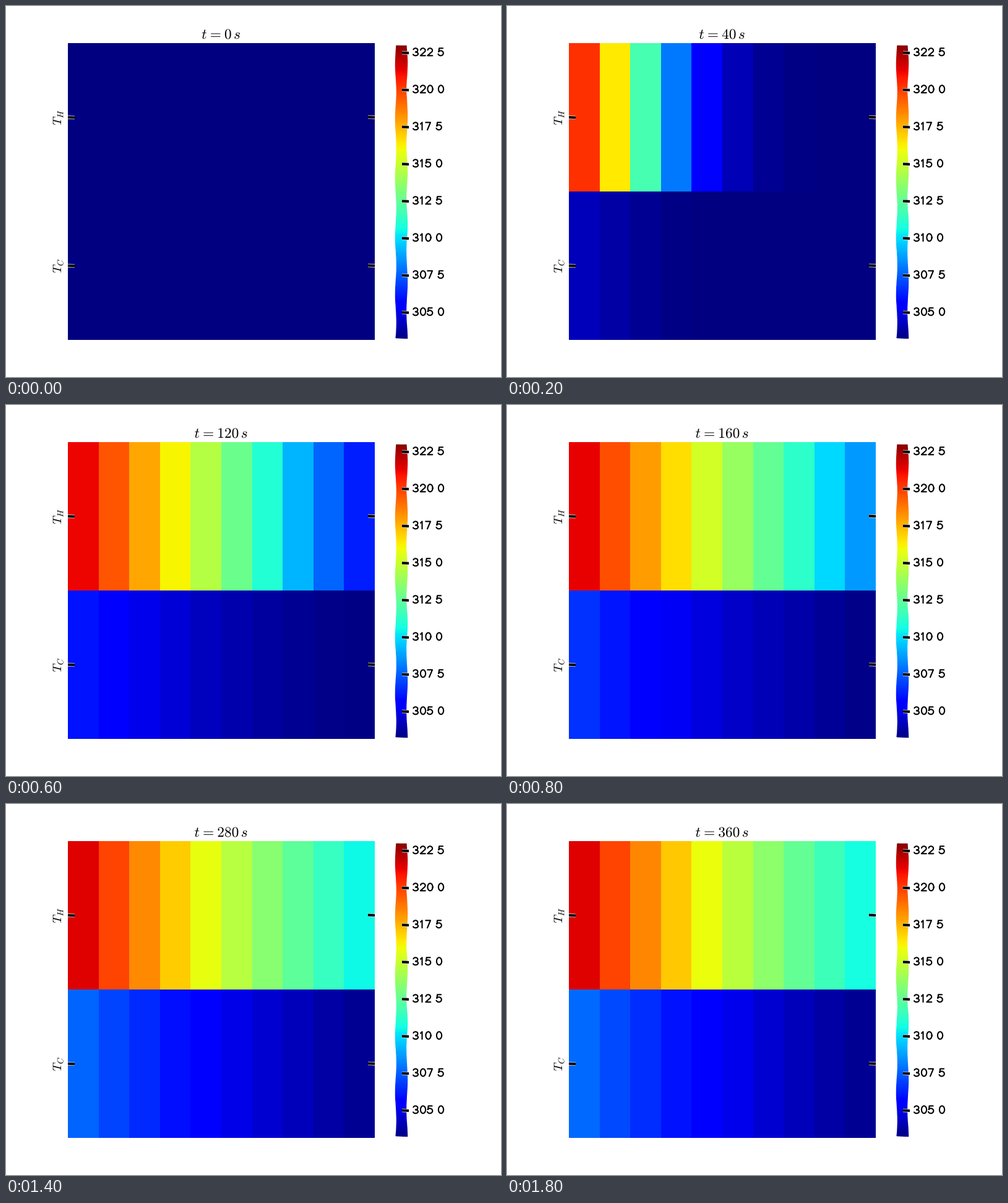
A matplotlib script that plays this animation: 800 by 600 pixels, repeating every 2000 ms.

```python
import numpy as np
import matplotlib.pyplot as plt
from matplotlib import patheffects
from matplotlib.animation import FuncAnimation

plt.rcParams.update({
    "path.sketch": (1, 100, 2),
    "path.effects": [patheffects.withStroke(linewidth=4, foreground="w")],
    "mathtext.fontset": "cm",
    "font.size": 14,
    "axes.titlepad": 5,
    "axes.axisbelow": False,
    "ytick.direction": "in",
    "ytick.major.size": 8,
    "ytick.major.width": 3,
    "ytick.major.pad": 4,
})

CELLS, FRAMES, STEP = 10, 10, 40
T_COLD, T_HOT = 303.15, 323.15
FLOW_HOT, FLOW_COLD = 0.070, 0.090       # cell renewal rates, 1/s
HEAT_HOT, HEAT_COLD = 0.0085, 0.0041     # exchange rates, 1/s


def simulate(dt=0.5):
    """Counterflow heat exchanger, one snapshot every STEP seconds."""
    hot = np.full(CELLS, T_COLD)
    cold = hot.copy()
    shots = []
    for _ in range(FRAMES):
        shots.append(np.array([hot, cold]))
        for _ in range(int(STEP / dt)):
            gap = hot - cold
            hot_in = np.r_[T_HOT, hot[:-1]]
            cold_in = np.r_[cold[1:], T_COLD]
            hot = hot + dt * (FLOW_HOT * (hot_in - hot) - HEAT_HOT * gap)
            cold = cold + dt * (FLOW_COLD * (cold_in - cold) + HEAT_COLD * gap)
    return shots


def arc(cx, cy, rx, ry, start, end):
    a = np.radians(np.linspace(start, end, 30))
    return list(zip(cx + rx * np.cos(a), cy + ry * np.sin(a)))


# Handwritten digits: (pen path with y down, advance)
GLYPHS = {
    "0": (arc(4.5, 6, 4.1, 6, 0, 365), 11.5),
    "1": ([(0.5, 2.5), (3, 0), (3, 12)], 8.5),
    "2": (arc(4.3, 3.6, 3.8, 3.6, 190, 390) + [(0.3, 12), (8.3, 12)], 11.5),
    "3": (arc(3.8, 3.1, 3.6, 3.1, 200, 450)
          + arc(3.9, 9, 4.1, 3, 270, 520), 11.5),
    "5": ([(7.6, 0), (1.6, 0), (1, 5.6)] + arc(4, 8, 4.3, 4, 215, 520), 11.5),
    "7": ([(0.2, 0), (8, 0), (3, 12)], 11.5),
    ".": ([(1.7, 11.6), (1.8, 11.6)], 6),
}


def write(ax, text, x, y):
    for char in text:
        pen, advance = GLYPHS[char]
        px, py = np.transpose(pen)
        line, = ax.plot(x + px, y + py, color="k",
                        lw=2.0 if char == "." else 1.5,
                        solid_capstyle="round", solid_joinstyle="round")
        line.set_path_effects([])
        line.set_sketch_params(None)
        x += advance


shots = simulate()
fig, ax = plt.subplots(figsize=(8, 6), dpi=100, facecolor="w")
fig.subplots_adjust(left=0.125, right=0.9, bottom=0.1, top=0.9)

mesh = ax.pcolormesh(shots[0], cmap="jet", vmin=T_COLD, vmax=T_HOT)
ax.invert_yaxis()
ax.set_xticks([])
ax.set_yticks([0.5, 1.5])
ax.set_yticklabels(["$T_H$", "$T_C$"], rotation=90, va="center")
ax.tick_params(axis="y", right=True)
ax.spines[:].set_visible(False)
title = ax.set_title("", fontsize=16.8)

marks = np.arange(305, 323, 2.5)
bar = fig.colorbar(mesh, ax=ax, ticks=marks)
bar.outline.set_edgecolor("w")
bar.outline.set_linewidth(0)
bar.ax.set_axisbelow(False)
bar.ax.tick_params(labelright=False)

page = fig.add_axes([0, 0, 1, 1])
page.set(xlim=(0, 800), ylim=(600, 0))
page.axis("off")
for mark in marks:
    write(page, f"{mark:.1f}", 658, 540 - (mark - T_COLD) * 24 - 7.3)


def draw(i):
    mesh.set_array(shots[i])
    title.set_text(rf"$t\hspace{{0.05}}=\hspace{{0.05}}{i * STEP}\,s$")
    return mesh, title


anim = FuncAnimation(fig, draw, frames=FRAMES, interval=200,
                     repeat=True, repeat_delay=0, blit=False)
plt.show()
```
